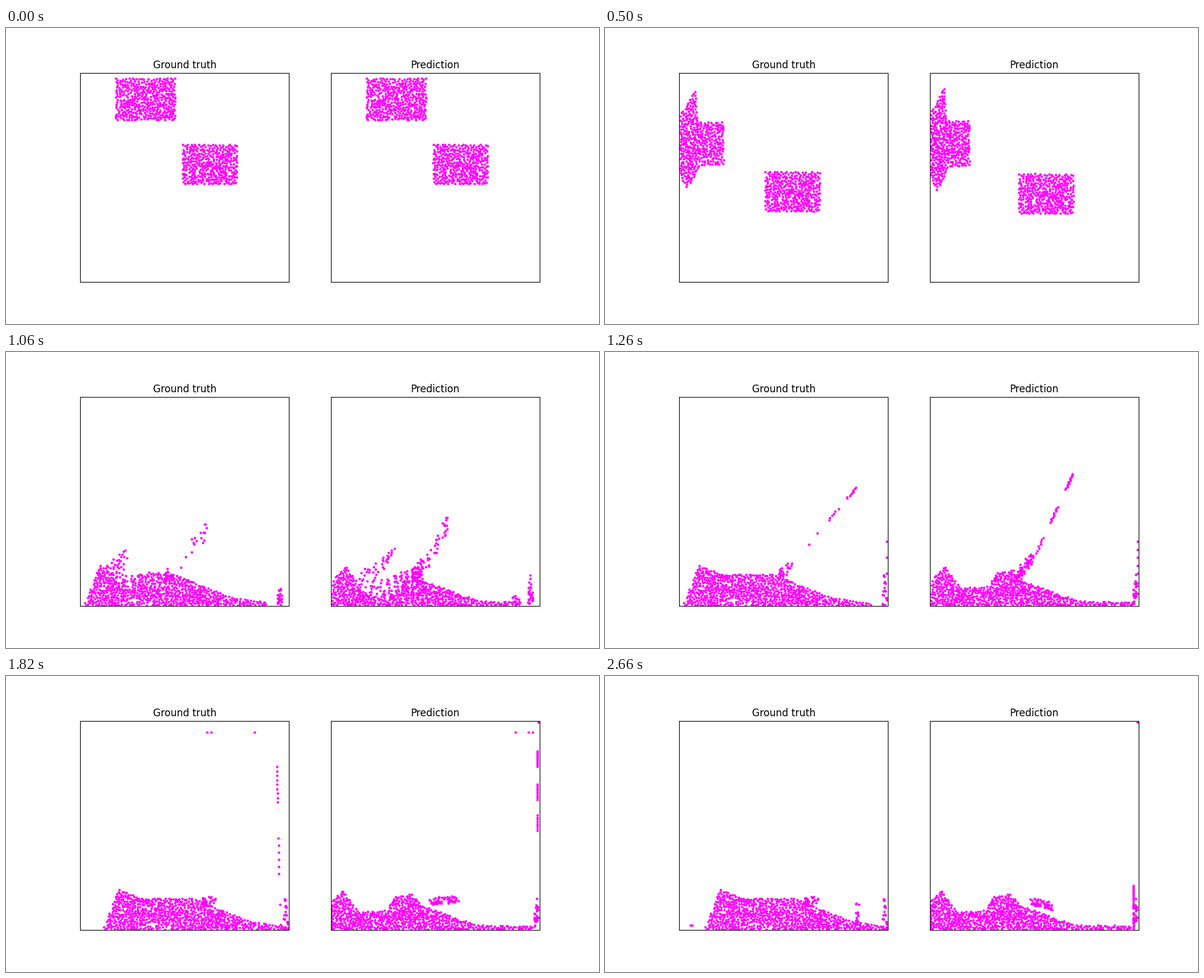
Recreate the animation shown at these times as a matplotlib script. Size 1000 by 500 pixels, loop 2.68 s.

```python
import numpy as np
import matplotlib.pyplot as plt
from matplotlib.animation import FuncAnimation
from matplotlib.path import Path

FRAMES, INTERVAL = 134, 20
GRAVITY = 0.235                        # pixels per frame squared
SIDE, TOP = 352.27, 76.36              # panel size and top edge in pixels
FLOOR, CEILING, WALL = 428, 78, 350    # x is measured from the panel's left edge
SQUEEZED, LANDING, SPLASHED = 25, 43, 63
SLIDE_SPEED, WALL_GAP = 4, 58
COUNT_A, COUNT_B = 420, 370
rng = np.random.default_rng(4)


def fill(corners, count):
    """Spread points evenly inside an outline by farthest-point sampling."""
    corners = np.array(corners, float)
    pool = rng.uniform(corners.min(0), corners.max(0), (count * 60, 2))
    pool = pool[Path(corners).contains_points(pool)][:count * 3]
    gap = np.full(len(pool), np.inf)
    picked = [0]
    while len(picked) < count:
        gap = np.minimum(gap, ((pool - pool[picked[-1]]) ** 2).sum(1))
        picked.append(gap.argmax())
    return pool[picked]


def column_order(points):
    columns = max(1, int((len(points) / 1.5) ** 0.5))
    by_x = np.argsort(points[:, 0])
    return np.concatenate([c[np.argsort(points[c, 1])]
                           for c in np.array_split(by_x, columns)])


def match(source, target):
    """Reorder target so that each point keeps its relative place."""
    result = np.empty_like(target)
    result[column_order(source)] = target[column_order(target)]
    return result


def box(x0, y0, x1, y1):
    return [(x0, y0), (x1, y0), (x1, y1), (x0, y1)]


def flare(x0, x1, top):
    """Block whose foot has begun to spread over the floor."""
    left, right = [[(x + sign * spread, y) for spread, y in
                    ((0, top), (8, top + 35), (22, FLOOR))]
                   for x, sign in ((x0, -1), (x1, 1))]
    return left + right[::-1]


def fall(t, speed=0):
    return speed * t + GRAVITY / 2 * t * t


def arc(t, span):
    """Rise above the straight line of a throw that lasts span frames."""
    return GRAVITY / 2 * t * (t - span)


block_a = fill(box(60, 85, 160, 155.5), COUNT_A)
block_b = fill(box(172.5, 196.5, 264.5, 263.5), COUNT_B)
fan = fill([(27, 106), (2, 145), (2, 252), (13, 271), (36, 231), (75, 230),
            (74, 159), (30, 157)], COUNT_A)


class Panel:
    def __init__(self, squash, speed_a, drift_b, speed_b, stretch, lean, drop, mound,
                 profile, slide, tongue, tongue_size, jet, clusters, bounce, climbers, pile):
        self.squash, self.speed_a = squash, speed_a
        self.drift_b, self.speed_b = drift_b, speed_b
        self.slide, self.tongue_path, self.bounce = slide, np.array(tongue, float), bounce
        self.climb_speed = np.array(climbers)

        middle = np.array([2, 194])
        self.wedge = match(block_a, (fan - middle) * stretch + middle)
        x, y = self.wedge.T
        x = x + lean * np.maximum(0, 155 - y) + lean / 2 * np.maximum(0, y - 245)
        self.fallen = np.column_stack([x, np.minimum(y + drop, FLOOR)])
        self.mound = match(block_b, fill(flare(*mound), COUNT_B))

        # The left foot of the mound is thrown up, the right foot runs to the wall.
        self.s = np.concatenate([c + np.linspace(-0.1, 0.1, k) for k, c in clusters])
        sizes = np.cumsum([tongue_size, len(self.s)])
        order = COUNT_A + np.argsort(self.mound[:, 0])
        self.tongue, self.jet, rest = np.split(order, sizes)
        rest, self.pile, self.climb = np.split(rest, [-pile - len(climbers), -len(climbers)])
        self.heap = np.concatenate([np.arange(COUNT_A), rest])

        self.start = np.vstack([self.fallen, self.mound])
        self.rest = match(self.start[self.heap], fill(profile, len(self.heap)))
        self.along = np.sqrt(rng.random(tongue_size))
        self.across = rng.uniform(-1, 1, (tongue_size, 2)) * 6
        (x0, y0, v0), (x1, y1, v1) = jet
        self.jet_x = x0 + (x1 - x0) * self.s
        self.jet_y = y0 + (y1 - y0) * self.s
        self.jet_speed = v0 + (v1 - v0) * self.s
        self.jet_x += rng.uniform(-2, 2, len(self.s))
        self.jet_rest = FLOOR - rng.uniform(0, 45, len(self.s))
        self.pile_at = np.column_stack([WALL - 7 * rng.random(pile),
                                        FLOOR - 55 * rng.random(pile)])

    def falling(self, n):
        if n <= SQUEEZED:
            slide = min(SLIDE_SPEED * n, self.squash)
            bend = max(0, slide - WALL_GAP) / (self.squash - WALL_GAP)
            final = block_a + (-self.squash, fall(SQUEEZED, self.speed_a))
            a = block_a + (-slide, fall(n, self.speed_a)) + bend * (self.wedge - final)
        else:
            t, span = n - SQUEEZED, LANDING - SQUEEZED
            a = self.wedge + (self.fallen - self.wedge) * t / span + (0, arc(t, span))
        bend = max(0, (n - 41) / 2)
        final = block_b + (-self.drift_b * LANDING, fall(LANDING, self.speed_b))
        b = block_b + (-self.drift_b * n, fall(n, self.speed_b)) + bend * (self.mound - final)
        return np.vstack([a, b])

    def settled(self, n):
        t = n - SPLASHED
        points = np.empty_like(self.start)
        points[self.heap] = self.rest + (self.slide * (1 - np.exp(-0.074 * t)), 0)
        points[self.pile] = self.pile_at

        ends = [np.interp(n, (63, 79, 106), track) for track in self.tongue_path.T]
        base, tip = np.array(ends).reshape(2, 2)
        points[self.tongue] = tip + (base - tip) * self.along[:, None] + self.across

        x = self.jet_x + 10 * t
        x -= (1 + self.bounce) * np.maximum(0, x - WALL)
        y = np.minimum(self.jet_y + fall(t, self.jet_speed), self.jet_rest)
        points[self.jet] = np.column_stack([x, y])

        speed = self.climb_speed
        x = WALL - speed * max(0, n - 77)
        x += 1.1 * np.maximum(0, 2 - x)
        up = FLOOR - 18 * (n - np.linspace(57, 60, len(speed)))
        y = np.maximum(up, CEILING) + np.where(speed > 0, fall(max(0, n - 79)), 0)
        points[self.climb] = np.column_stack([x, y])
        return points

    def splashing(self, t):
        span = SPLASHED - LANDING
        step = self.settled(SPLASHED) - self.start
        need = np.clip(np.hypot(*step.T) / 9.5, 4, span)
        p = np.repeat(np.minimum(1, t / need)[:, None], 2, axis=1)
        thrown = np.concatenate([self.tongue, self.jet])
        runners = np.concatenate([self.pile, self.climb])
        p[thrown] = t / span
        p[runners] = min(1, t / 11), np.clip((t - 9) / 11, 0, 1)
        points = self.start + step * p
        points[thrown, 1] += arc(t, span)
        return points

    def at(self, n):
        if n < LANDING:
            points = self.falling(n)
        elif n < SPLASHED:
            points = self.splashing(n - LANDING)
        else:
            points = self.settled(n)
        return np.clip(points, (1.2, TOP + 0.8), (SIDE - 1.2, TOP + SIDE - 1))


truth = Panel(
    squash=85, speed_a=0.06, drift_b=1.1, speed_b=-1.095,
    stretch=(1, 1), lean=0.26, drop=139, mound=(124, 219, 367),
    profile=[(6, 428), (33, 360), (70, 375), (165, 376), (195, 391), (258, 415),
             (322, 425), (324, 428)],
    slide=36, tongue_size=25,
    tongue=[(168, 376, 196, 356), (200, 380, 230, 377), (210, 380, 240, 377)],
    jet=[(222, 320, 1.5), (298, 229, -6)], clusters=[(2, 0.05), (6, 0.5), (9, 0.9)],
    bounce=0.08, climbers=(4, 9.2, 9.7), pile=20)

prediction = Panel(
    squash=94, speed_a=0.18, drift_b=0.9, speed_b=-0.94,
    stretch=(0.89, 1.06), lean=0.6, drop=149, mound=(133, 227, 371),
    profile=[(1, 428), (3, 385), (25, 362), (52, 399), (98, 396), (114, 373),
             (142, 368), (158, 387), (248, 420), (345, 423), (346, 428)],
    slide=-6, tongue_size=60,
    tongue=[(145, 382, 187, 326), (164, 382, 244, 357), (170, 380, 222, 394)],
    jet=[(183, 333, -6.1), (242, 203, -6.1)], clusters=[(8, 0.05), (11, 0.45), (14, 0.88)],
    bounce=0.012, climbers=(0, 0, 0.7, 1.2, 2.8), pile=24)

panels = (truth, prediction)
fig, axes = plt.subplots(1, 2, figsize=(10, 5), dpi=100)
dots = []
for ax, title in zip(axes, ("Ground truth", "Prediction")):
    ax.set(xlim=(0, SIDE), ylim=(TOP + SIDE, TOP), xticks=[], yticks=[], aspect="equal")
    ax.set_title(title)
    dots += ax.plot([], [], "o", ms=2, color="magenta")


def update(n):
    for line, panel in zip(dots, panels):
        line.set_data(*panel.at(n).T)
    return dots


anim = FuncAnimation(fig, update, frames=FRAMES, interval=INTERVAL,
                     repeat=True, repeat_delay=0)
plt.show()
```
